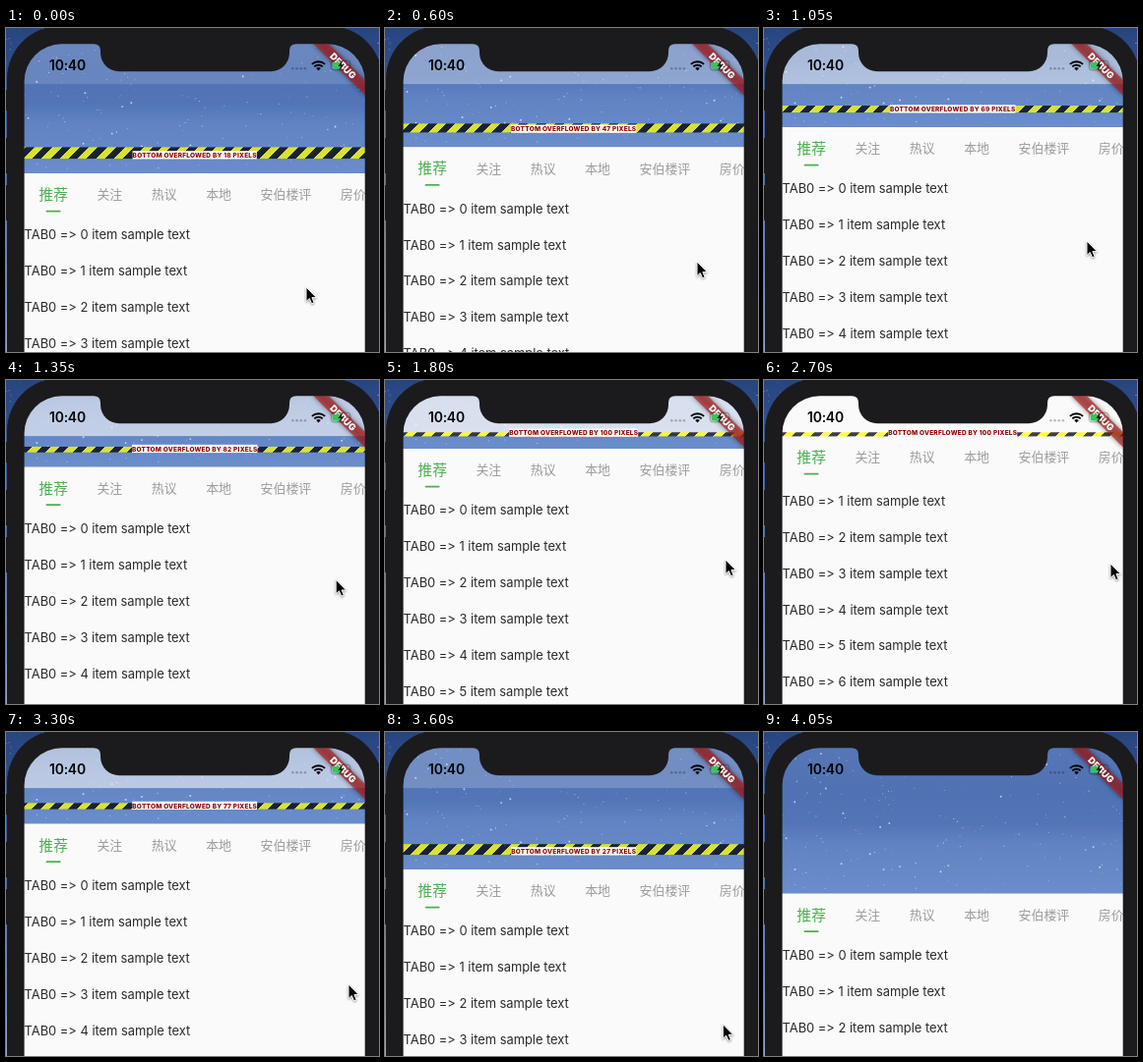
Write an HTML page that moves like this. It is 379 by 330 pixels and loops after 5.25 s.

```html
<!DOCTYPE html>
<html lang="zh-CN">
<head>
<meta charset="utf-8">
<title>Collapsing header</title>
<style>
  html, body { margin: 0; width: 100%; height: 100%; overflow: hidden; background: #1b1b1d; }
  svg { display: block; width: 379px; height: 330px; }
  text { font-family: Inter, "Noto Sans", sans-serif; font-variant-ligatures: none; font-feature-settings: "calt" 0; }
  #rows text { font-size: 12.92px; letter-spacing: -.02px; fill: #2b2b2b; white-space: pre; }
  #tabs text { font-family: "Noto Sans CJK SC", "Noto Sans CJK", sans-serif; font-size: 12.92px; fill: #9c9c9c; }
  #tabs text.on { font-size: 14.77px; font-weight: 500; fill: #4caf50; }
  #label { font-size: 6.5px; font-weight: 800; letter-spacing: .22px; fill: #900000; }
  #mouse { filter: drop-shadow(0 1px 1px rgba(0, 0, 0, .4)); }
  .clock { font-size: 13.9px; font-weight: 600; letter-spacing: -.2px; }
  .debug { font-size: 9.4px; font-weight: 900; fill: #fff; }
</style>
</head>
<body>
<svg viewBox="0 0 379 330">
  <defs>
    <linearGradient id="wall" x1="0" y1="0" x2="0" y2="1">
      <stop offset="0" stop-color="#27457f"/>
      <stop offset=".3" stop-color="#3a5c9c"/>
      <stop offset="1" stop-color="#8fa3c6"/>
    </linearGradient>
    <linearGradient id="blue" x1="0" y1="0" x2="0" y2="1">
      <stop offset="0" stop-color="#5676b7"/>
      <stop offset=".3" stop-color="#4f72b4"/>
      <stop offset=".52" stop-color="#5175b7"/>
      <stop offset=".66" stop-color="#6083c3"/>
      <stop offset="1" stop-color="#6a8dcb"/>
    </linearGradient>
    <linearGradient id="hazard" gradientUnits="userSpaceOnUse" spreadMethod="repeat"
      x1="18.6" y1="16.4" x2="27.83" y2="25.63">
      <stop offset=".25" stop-color="#000"/>
      <stop offset=".25" stop-color="#ff0"/>
      <stop offset=".75" stop-color="#ff0"/>
      <stop offset=".75" stop-color="#000"/>
    </linearGradient>
    <filter id="soft" x="-20%" y="-80%" width="140%" height="260%"><feGaussianBlur stdDeviation="2.6"/></filter>
    <clipPath id="head"><rect id="headBox" x="18" y="16" width="348" height="148"/></clipPath>
  </defs>

  <rect width="379" height="330" fill="url(#wall)"/>
  <g id="wallStars" fill="#fff"></g>
  <path d="M0 63h2v21h-2zM0 112h2v36h-2zM0 160h2v36h-2z" fill="#1b1b1d"/>

  <rect x="18" y="16" width="348" height="314" fill="#fafafa"/>
  <g id="rows"></g>
  <g id="tabs">
    <rect x="18" y="-1" width="348" height="45.3" fill="#fafafa"/>
    <rect x="40.6" y="37.7" width="15" height="1.8" rx=".9" fill="#4caf50"/>
  </g>
  <g clip-path="url(#head)">
    <g id="sky" fill="#fff">
      <rect x="18" y="16" width="348" height="149" fill="url(#blue)"/>
    </g>
  </g>
  <rect id="veil" x="18" y="16" width="348" height="41.1" fill="#fafafa"/>
  <g id="warn">
    <rect id="stripe" x="18" width="348" fill="url(#hazard)" opacity=".75"/>
    <rect id="plate" height="8.25" fill="#fff"/>
    <text id="label" text-anchor="middle" x="191.7"></text>
  </g>

  <g transform="translate(364.7 16.3) rotate(45)">
    <rect x="-37" y="25.8" width="74" height="11.1" fill="#000" opacity=".45" filter="url(#soft)"/>
    <rect x="-37" y="25.8" width="74" height="11.1" fill="#b71c1c" opacity=".63"/>
    <text class="debug" text-anchor="middle" y="34.8">DEBUG</text>
  </g>

  <text class="clock" x="44" y="42.9">10:40</text>
  <g opacity=".25">
    <circle cx="291.3" cy="41.2" r="1.3"/><circle cx="295.5" cy="41.2" r="1.3"/>
    <circle cx="299.7" cy="41.2" r="1.3"/><circle cx="303.9" cy="41.2" r="1.3"/>
  </g>
  <g fill="none" stroke="#000" stroke-width="2">
    <path d="M310.9 36.9a9.4 9.4 0 0 1 13.2 0M313.3 39.4a6 6 0 0 1 8.4 0"/>
    <path d="M315.2 41.1a3.3 3.3 0 0 1 4.6 0l-2.3 2.3z" fill="#000" stroke="none"/>
  </g>
  <rect x="330.3" y="33.3" width="19.6" height="9.6" rx="2.6" fill="none" stroke="#000" stroke-opacity=".35" stroke-width=".9"/>
  <rect x="331.7" y="34.7" width="8.6" height="6.8" rx="1.3" fill="#34c759"/>
  <path d="M341.8 33.4l-4.4 5.4h2.7l-1.2 4 4.6-5.6h-2.8z"/>

  <path fill="#1b1b1d" fill-rule="evenodd" d="M1 400V52A54 54 0 0 1 55 -2H328.3A54 54 0 0 1 382.3 52V400Z
    M18.6 400V54.3A38 38 0 0 1 56.6 16.3H89Q96 16.3 96 23.3V25.3A19 19 0 0 0 115 44.3H269A19 19 0 0 0 288 25.3V23.3Q288 16.3 295 16.3H326.7A38 38 0 0 1 364.7 54.3V400Z"/>
  <path id="mouse" d="M0 0V14.6L3.3 11.5 5.6 16.8 8.1 15.7 5.9 10.6H10.4Z" stroke="#fff" stroke-width="1"/>
</svg>
<script>
const $ = id => document.getElementById(id);
const K = 0.923, TOP = 16, FULL = 164.6, MIN = 57.1, BAR = 44.3, ROW = 36.92, FADE = 122;

function add(parent, tag, attrs, text) {
  const el = document.createElementNS('http://www.w3.org/2000/svg', tag);
  set(el, attrs);
  if (text) el.textContent = text;
  parent.appendChild(el);
}
function set(el, attrs) {
  for (const k in attrs) el.setAttribute(k, attrs[k]);
}

let seed = 41;
const rnd = () => (seed = (seed * 16807) % 2147483647) / 2147483647;
function stars(parent, n, x, y, w, h) {
  for (let i = 0; i < n; i++) {
    const big = rnd() > .9;
    add(parent, 'circle', {
      cx: (x + rnd() * w).toFixed(1), cy: (y + rnd() * h).toFixed(1),
      r: big ? .95 : .4 + rnd() * .3, opacity: (big ? .65 : .2 + rnd() * .45).toFixed(2)
    });
  }
}
stars($('sky'), 190, 18, 16, 348, 146);
stars($('wallStars'), 22, 0, 0, 45, 45);
stars($('wallStars'), 22, 338, 0, 41, 45);

for (let i = 0; i < 10; i++)
  add($('rows'), 'text', { x: 18.6, y: (i + .5) * ROW + 4.6 }, `TAB0 => ${i} item sample text`);

let tabX = 18.6 + 16 * K;
['推荐', '关注', '热议', '本地', '安伯楼评', '房价'].forEach((name, i) => {
  const size = (i ? 14 : 16) * K;
  add($('tabs'), 'text', { x: tabX, y: 21.4 + size * .38, class: i ? '' : 'on' }, name);
  tabX += name.length * size + 32 * K;
});

// time, header bottom (keeps going below MIN as list scroll)
const scroll = [[0, 148], [600, 121.3], [1050, 101], [1800, 70], [2100, 38], [2250, 14],
  [2400, -5], [2550, 5], [2700, 23.5], [3300, 93.5], [3600, 140], [3750, 157], [3900, 163], [4050, FULL]];
// time, x, y
const pointer = [[0, 305, 264], [600, 317, 238], [1050, 328, 217], [1800, 346, 183], [2100, 358, 164],
  [2250, 364, 158], [2400, 362, 159], [2550, 357, 169], [2700, 352, 187], [3300, 348, 257],
  [3750, 341, 318], [3900, 338, 345]];

function at(keys, t, col) {
  let i = 1;
  while (i < keys.length - 1 && keys[i][0] < t) i++;
  const a = keys[i - 1], b = keys[i];
  const p = Math.min(1, (t - a[0]) / (b[0] - a[0]));
  return a[col] + (b[col] - a[col]) * p;
}

function draw(t) {
  const pos = at(scroll, t, 1), bottom = Math.max(MIN, pos);
  set($('rows'), { transform: `translate(0 ${pos + BAR})` });
  set($('tabs'), { transform: `translate(0 ${bottom})` });
  set($('headBox'), { height: bottom - TOP });
  set($('sky'), { transform: `translate(0 ${bottom - FULL})` });
  set($('veil'), { opacity: Math.min(1, (FULL - pos) / FADE) });

  const over = Math.min(100, (FULL - bottom) / K);
  set($('warn'), { visibility: over >= .5 ? 'visible' : 'hidden' });
  const base = MIN + .3 + (100 - over) * K, h = (base - TOP) * .1;
  set($('stripe'), { y: base - h, height: h });
  $('label').textContent = `BOTTOM OVERFLOWED BY ${Math.round(over)} PIXELS`;
  set($('label'), { y: base - 1.1 });
  const w = $('label').getComputedTextLength();
  set($('plate'), { x: 191.7 - w / 2, y: base - 7.85, width: w });

  set($('mouse'), { transform: `translate(${at(pointer, t, 1)} ${at(pointer, t, 2)})` });
}

function tick() {
  const t = performance.now() % 5250;
  draw(Math.min(4050, Math.floor(t / 150) * 150));
  requestAnimationFrame(tick);
}
tick();
</script>
</body>
</html>
```
